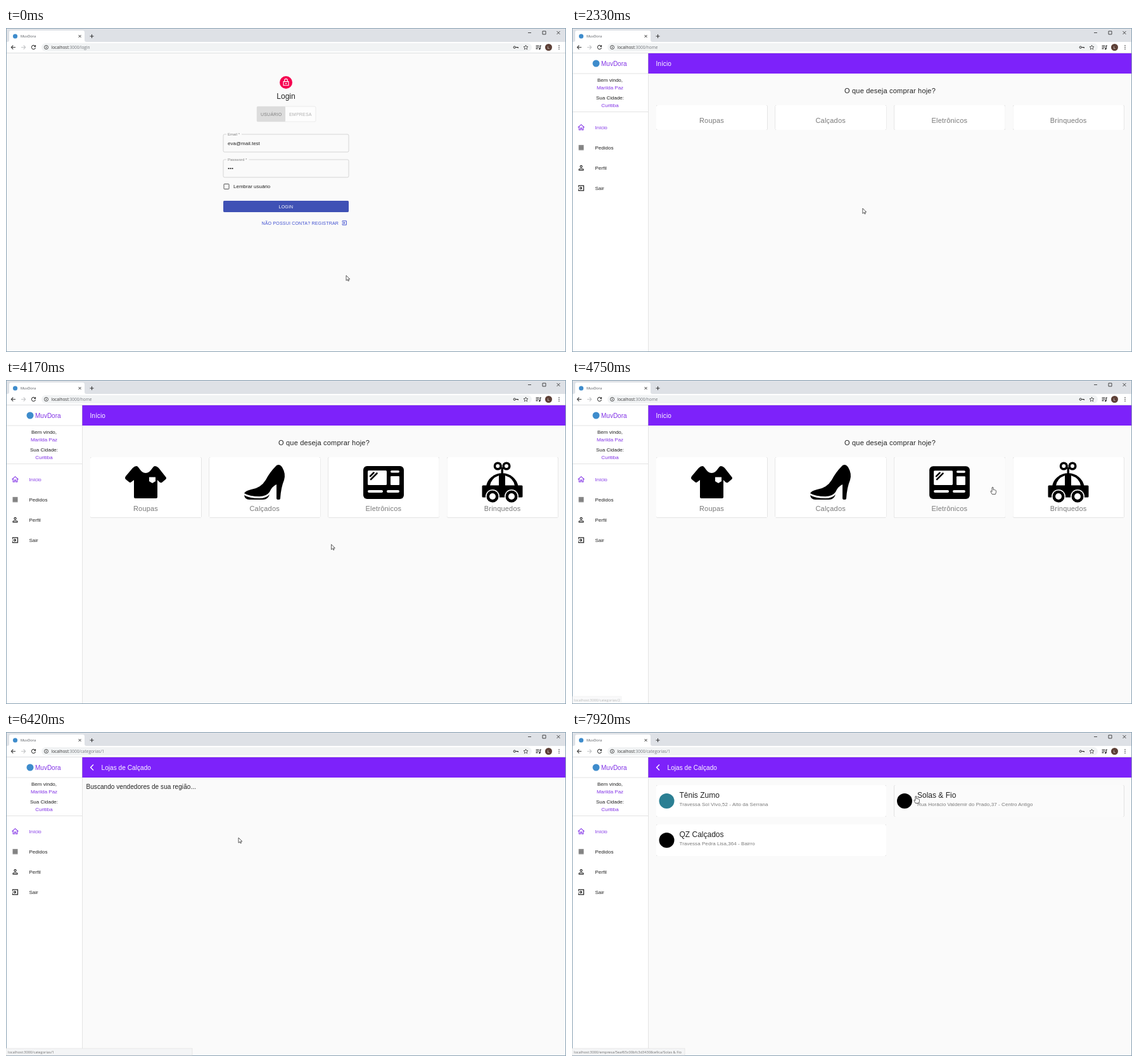
Write an HTML page that moves like this. It is 884x512 px and loops after 8000 ms.

```html
<!DOCTYPE html>
<html lang="pt-BR">
<head>
<meta charset="utf-8">
<title>MuvDora</title>
<style>
html, body { margin: 0; width: 100%; height: 100%; overflow: hidden; background: #fafafa; }
svg { display: block; width: 884px; height: 512px; }
text { font-family: "Liberation Sans", Arial, sans-serif; white-space: pre; }
.ui { font-family: "Open Sans", "Noto Sans", sans-serif; }
.mid { text-anchor: middle; }
.line { fill: none; stroke-width: 1.1; }
.lift { filter: drop-shadow(0 .9px .7px rgba(0, 0, 0, .4)); }
</style>
</head>
<body>
<svg id="stage" viewBox="0 0 884 512"></svg>
<script>
const LOOP = 8000, STEP = 1000 / 12;
const INK = '#222', DIM = '#7a7a7a', EDGE = '#e4e4e4', PURPLE = '#8233e6', BAR = '#7d22fa', CARD = '#fff';
const BRAND = 'MuvDora';

// Markup helpers
const text = (x, y, size, str, fill = INK, more = '') =>
  `<text x="${x}" y="${y}" font-size="${size}" fill="${fill}" ${more}>${str}</text>`;
const mid = (x, y, size, str, fill, more = '') => text(x, y, size, str, fill, `class="mid" ${more}`);
const ui = (x, y, size, str, fill, more = '') => text(x, y, size, str, fill, `class="ui" ${more}`);
const rect = (x, y, w, h, fill, more = '') =>
  `<rect x="${x}" y="${y}" width="${w}" height="${h}" fill="${fill}" ${more}/>`;
const dot = (x, y, r, fill, more = '') => `<circle cx="${x}" cy="${y}" r="${r}" fill="${fill}" ${more}/>`;
const path = (d, fill, more = '') => `<path d="${d}" fill="${fill}" ${more}/>`;
const line = (d, color, more = '') => `<path class="line" d="${d}" stroke="${color}" ${more}/>`;
const group = (id, body, more = '') => `<g id="${id}" ${more}>${body}</g>`;
const spaced = n => `letter-spacing="${n}"`;

const exitIcon = (x, y, size, color) =>
  line('M-4 -2v-2.2h8.4v8.4h-8.4V2M-4.4 0h5.4m-2 -2.2l2.2 2.2l-2.2 2.2', color,
    `transform="translate(${x} ${y}) scale(${size})" style="stroke-width:1.3"`);

function browser() {
  return rect(0, 0, 884, 22, '#dee1e6') +
    path('M2 22Q5 22 5 19V7Q5 4 8 4H121Q124 4 124 7V19Q124 22 127 22Z', '#fff') +
    rect(0, 22, 884, 17, '#fff') + rect(56, 24, 774, 13, '#f1f3f4', 'rx="6.5"') +
    rect(0, 39, 884, 1, '#dcdee0') +
    dot(14.5, 13, 3.6, '#3e8ccc') + ui(23, 15.2, 5.6, BRAND, '#50545a') +
    line('M114.5 11l4 4m0 -4l-4 4M132.5 13h6m-3 -3v6', INK, 'style="stroke-width:.9"') +
    line('M824 7.5h5M847 5h5v5h-5zM869.5 5l5 5m0 -5l-5 5', INK, 'style="stroke-width:.8"') +
    line('M15 30.5H8.3m3 -3l-3 3l3 3', '#444') +
    line('M24 30.5h6.7m-3 -3l3 3l-3 3', '#c4c6c8') +
    line('M46 28.6a3.1 3.1 0 1 0 .5 2.6M46.6 27v2.4h-2.4', '#444') +
    dot(63.5, 30.5, 3, 'none', `stroke="${INK}" stroke-width=".8"`) +
    line('M63.5 30v2M63.5 28.6v.8', INK, 'style="stroke-width:.8"') +
    dot(802.7, 30.5, 1.6, 'none', `stroke="${INK}"`) + line('M804.4 30.5h3.8v1.6', INK) +
    path('M820.5 27l1 2.4l2.5 .2l-1.9 1.7l.6 2.5l-2.2 -1.3l-2.2 1.3l.6 -2.5l-1.9 -1.7l2.5 -.2z', 'none',
      `stroke="${INK}" stroke-width=".7"`) +
    line('M836.5 28h5M836.5 30.3h5M836.5 32.6h3M843.2 33v-5h1.8', INK) + dot(842.3, 33, 1.2, INK) +
    dot(856.5, 30.5, 5.5, '#5d4037') + mid(856.5, 32.5, 5.5, 'L', '#fff') +
    [27.8, 30.5, 33.2].map(y => dot(873, y, .75, INK)).join('') +
    `<text class="ui" x="71.5" y="33" font-size="6.5" fill="#75797e"><tspan fill="#333">localhost</tspan>:3000/<tspan id="route"></tspan></text>`;
}

function field(y, label, gap, value) {
  return line(`M348 ${y}H345Q343 ${y} 343 ${y + 2}V${y + 26}Q343 ${y + 28} 345 ${y + 28}H539Q541 ${y + 28} 541 ${y + 26}V${y + 2}Q541 ${y} 539 ${y}H${gap}`,
    '#c4c4c4', 'style="stroke-width:.7"') +
    text(350, y + 2, 6, label, '#808080') + value;
}

function login() {
  return dot(442, 86, 10, '#f50050') +
    line('M438 84.6h8v6.2h-8zM439.6 84.4v-1.6a2.4 2.4 0 0 1 4.8 0v1.6', '#fff') + dot(442, 87.7, 1, '#fff') +
    mid(442, 112, 12, 'Login') +
    rect(396, 124, 93, 24, '#fdfdfd', `rx="2" stroke="${EDGE}" stroke-width=".7"`) +
    rect(396, 124, 45, 24, '#dcdcdc', 'rx="1"') +
    text(402, 138.5, 7, 'USUÁRIO', '#808080', spaced(.2)) +
    text(447, 138.5, 7, 'EMPRESA', '#b0b0b0', spaced(.2)) +
    field(168, 'Email *', 372, text(350, 184.6, 8, 'eva@mail.test')) +
    field(208, 'Password *', 383.5, [351.5, 354.5, 357.5].map(x => dot(x, 222, 1.1, INK)).join('')) +
    rect(344, 246.5, 8, 8, 'none', 'rx=".6" stroke="#555"') + text(359, 253.2, 8, 'Lembrar usuário') +
    rect(343, 273, 198, 18, '#3f51b5', 'id="enter" class="lift" rx="2"') +
    mid(442, 284.6, 7, 'LOGIN', '#fff', spaced(.2)) +
    text(403.5, 310.5, 7, 'NÃO POSSUI CONTA? REGISTRAR', '#3f4fd0', spaced(.2)) +
    exitIcon(534, 308, .75, '#3f4fd0');
}

function sidebar() {
  const items = [['Início', 157, PURPLE], ['Pedidos', 189, INK], ['Perfil', 221, INK], ['Sair', 253, INK]];
  return rect(0, 40, 120, 472, '#fff') + rect(120, 40, 1, 472, EDGE) +
    rect(1, 71.5, 119, 1, EDGE) + rect(1, 132, 119, 1, EDGE) +
    dot(38, 56, 5.5, '#3e8ccc') + text(46, 59.6, 10, BRAND, PURPLE) +
    mid(60, 85, 8, 'Bem vindo,') + mid(60, 97, 8, 'Marilda Paz', PURPLE) +
    mid(60, 113, 8, 'Sua Cidade:') + mid(60, 125, 8, 'Curitiba', PURPLE) +
    items.map(([name, y, color]) => text(36.5, y + 2.7, 8, name, color)).join('') +
    line('M9.5 157.2l5 -4.5l5 4.5M11.2 156v5h2.3v-3h2v3h2.3v-5', PURPLE) +
    line('M10.5 185.7h8M10.5 187.9h8M10.5 190.1h8M10.5 192.3h8', INK) +
    dot(14.5, 219, 1.6, 'none', `stroke="${INK}" stroke-width="1.1"`) +
    line('M11 224.6v-1.2Q11 222.3 14.5 222.3T18 223.4v1.2z', INK) +
    exitIcon(14.3, 253, .95, INK);
}

const ICONS = [
  path('M206 136C210 136 212 147 220.5 147S231 136 235 136Q238 136 241 139L252 153Q254 155 252 157L246 162Q244 163 242 161L239 158V185Q239 187 237 187H204Q202 187 202 185V158L198 161Q196 163 194 161L189 157Q187 155 189 152L200 139Q203 136 206 136Z', '#000') +
    path('M226 153.5H236V160L231 163L226 160Z', CARD),
  path('M427 135Q432 132 436 138Q442 148 439 158Q434 170 433 187Q433 189 430 189Q427 189 427 187V165Q420 168 416 177Q411 184 400 184Q384 184 376 179Q378 175 387 173Q402 171 410 158Q416 146 427 135Z', '#000') +
    path('M376 182Q384 187 400 187Q410 187 416 181Q413 189 406 189H384Q377 189 376 182Z', '#000'),
  rect(564, 136, 64, 52, '#000', 'rx="6"') + rect(571, 143, 30, 23, CARD, 'rx="1.5"') +
    rect(607, 143, 14, 3.5, CARD, 'rx="1.7"') + rect(607, 152, 14, 14, CARD, 'rx="1"') +
    rect(571, 174, 24, 4, CARD, 'rx="2"') + rect(601, 174, 20, 4, CARD, 'rx="2"') +
    line('M575 152l5.5 -5.5M576 157l9.5 -9.5', '#000', 'style="stroke-width:2.6" stroke-linecap="round"'),
  path('M758 168A25.5 24 0 0 1 808.5 168Z', '#000') +
    path('M764 167Q766 155 778 151V167ZM788 151Q801 155 803 167H788Z', CARD) +
    rect(751.5, 166.5, 64, 19, '#000', 'rx="1.5"') +
    [768, 798].map(x => dot(x, 184, 11, CARD) + dot(x, 184, 9.5, '#000') + dot(x, 184, 5, CARD)).join('') +
    rect(781.5, 138, 3.5, 12, '#000') + dot(783.2, 152, 4, '#000') +
    [776.3, 790].map(x => dot(x, 136, 4.8, 'none', 'stroke="#000" stroke-width="3.6"')).join('')
];
const NAMES = ['Roupas', 'Calçados', 'Eletrônicos', 'Brinquedos'];
const cardX = i => 133 + i * 187.7;

function home() {
  return text(132.5, 59.6, 10, 'Início', '#fff', spaced(.07)) +
    mid(502, 102.6, 11, 'O que deseja comprar hoje?', INK, spaced(.2)) +
    NAMES.map((name, i) =>
      rect(cardX(i), 122, 175.5, 39, CARD, `id="card${i}" class="lift" rx="2"`) +
      group('icon' + i, ICONS[i]) +
      mid(cardX(i) + 87.5, 0, 11, name, DIM, `id="name${i}" ${spaced(.2)}`)).join('');
}

const STORES = [
  { x: 133, y: 84, name: 'Tênis Zumo', street: 'Travessa Sol Vivo,52 - Alto da Serrana', color: '#2b7f93', id: '5eaf61b20bfc3d34308ce9c4' },
  { x: 508.5, y: 84, name: 'Solas &amp; Fio', street: 'Rua Horácio Valdemir do Prado,37 - Centro Antigo', color: '#000', id: '5eaf65c00bfc3d34308ce9ca' },
  { x: 133, y: 146, name: 'QZ Calçados', street: 'Travessa Pedra Lisa,364 - Bairro', color: '#000', id: '5eaf67d40bfc3d34308ce9d1' }
];
const storeUrl = i => `empresa/${STORES[i].id}/${STORES[i].name}`;

function shops() {
  return line('M138 51.6L133.6 56L138 60.4', '#fff', 'style="stroke-width:1.4"') +
    text(150.5, 59.6, 10, 'Lojas de Calçado', '#fff', spaced(.07)) +
    group('wait', text(126.5, 89.6, 10, 'Buscando vendedores de sua região...', INK, spaced(.06))) +
    group('list', STORES.map((s, i) =>
      rect(s.x, s.y, 363, 50, CARD, `id="store${i}" class="lift" rx="2"`) + dot(s.x + 16.5, s.y + 25, 12, s.color) +
      text(s.x + 36.5, s.y + 20.2, 12, s.name) + text(s.x + 36.5, s.y + 33.4, 8, s.street, DIM, spaced(.07))).join(''));
}

const stage = document.getElementById('stage');
stage.innerHTML = rect(0, 0, 884, 512, '#fafafa') +
  group('login', login()) +
  group('app', sidebar() + rect(120.5, 40, 764, 32, BAR, 'class="lift"') +
    group('home', home()) + group('shops', shops())) +
  browser() +
  rect(.5, .5, 883, 511, 'none', 'stroke="#8aa2b4" stroke-width="1"') +
  group('status', rect(0, 500, 78, 11, '#f4f5f6', 'id="bubble" stroke="#dcdcdc" stroke-width=".6"') +
    ui(3, 508, 5.7, '', '#707070', 'id="link"')) +
  group('cursor',
    path('M0 0V8.2L2 6.4L3.2 9L4.5 8.4L3.3 5.9H5.8Z', '#fff', 'id="arrow"') +
    path('M-1 1Q0 -.6 1 1V4.5Q2 3.7 2.8 4.8Q3.8 4.2 4.3 5.2Q5.4 5 5.4 6.4V8.6L4.4 11.5H-.8L-3 7.6Q-3.4 6.2 -2 6.4L-1 7.4Z', '#fff', 'id="hand"'),
    'stroke="#333" stroke-width=".8" stroke-linejoin="round"');

const el = {};
stage.querySelectorAll('[id]').forEach(n => el[n.id] = n);
const show = (node, on) => node.setAttribute('display', on ? 'inline' : 'none');
const set = (node, attrs) => { for (const k in attrs) node.setAttribute(k, attrs[k]); };
const clamp = v => Math.max(0, Math.min(1, v));

// Page changes in ms
const HOME = 2080, ICONS_IN = 2490, SHOPS = 6410, LIST_IN = 6660;

// Pointer stops: time, x, y
const WAY = [
  [0, 537, 391], [250, 537, 391], [1080, 537, 306], [1500, 537, 290], [1600, 537, 290],
  [1920, 459, 285], [2330, 459, 285], [2920, 435, 283], [3200, 292, 219], [3400, 268, 160],
  [3480, 270, 168], [3670, 300, 250], [3900, 390, 266], [4500, 668, 252], [4690, 668, 219],
  [4750, 664, 169], [5330, 146, 138], [5500, 137, 131], [6170, 367, 167], [6850, 367, 167],
  [7750, 480, 114], [7900, 543, 101], [8000, 543, 101]
];
function pointer(t) {
  const i = Math.max(1, WAY.findIndex(w => w[0] >= t));
  const [t0, x0, y0] = WAY[i - 1], [t1, x1, y1] = WAY[i];
  const k = clamp((t - t0) / (t1 - t0));
  return [x0 + (x1 - x0) * k, y0 + (y1 - y0) * k];
}

const inside = ([x, y], l, t, w, h) => x >= l && x <= l + w && y >= t && y <= t + h;
const onEnter = p => inside(p, 343, 273, 198, 18);
const onCard = (p, i) => inside(p, cardX(i), 122, 175.5, 95);
const onStore = (p, i) => inside(p, STORES[i].x, STORES[i].y, 363, 50);

// Share of the last moments spent over a target eases hover in and out
function hover(t, hit) {
  let n = 0;
  for (let k = 0; k < 8; k++) n += hit(pointer(Math.max(0, t - k * 20))) ? 1 : 0;
  return (n / 8) ** 2;
}
const grey = v => `rgb(${v},${v},${v})`;

const LINKS = [
  [0, ''], [4660, 'categorias/2'], [5000, 'categorias/1'], [5240, 'categorias/0'],
  [5740, 'categorias/1'], [6580, ''], [6910, storeUrl(2)], [7410, storeUrl(0)], [7830, storeUrl(1)]
];

function drawCard(i, t) {
  const full = t >= ICONS_IN, h = full ? hover(t, p => onCard(p, i)) : 0;
  set(el['card' + i], {
    x: cardX(i) - h, y: 122 - h * .6, width: 175.5 + 2 * h, height: (full ? 95.5 : 39) + 3 * h,
    fill: grey(255 - 18 * h)
  });
  const cx = cardX(i) + 87.5, s = 1 - .03 * h;
  set(el['icon' + i], { transform: `translate(${cx} ${162 + h * .7}) scale(${s}) translate(${-cx} -162)` });
  show(el['icon' + i], full);
  set(el['name' + i], { y: (full ? 206.6 : 150) + h * .5 });
}

function draw(time) {
  const t = Math.floor((time + 5) / STEP) * STEP;
  const isHome = t >= HOME && t < SHOPS, isShops = t >= SHOPS;
  const p = pointer(t);

  show(el.login, t < HOME);
  show(el.app, t >= HOME);
  show(el.home, isHome);
  show(el.shops, isShops);
  show(el.wait, t < LIST_IN);
  show(el.list, t >= LIST_IN);
  el.route.textContent = isShops ? 'categorias/1' : isHome ? 'home' : 'login';

  const e = hover(t, onEnter);
  set(el.enter, { fill: `rgb(${63 - 15 * e},${81 - 18 * e},${181 - 22 * e})` });
  NAMES.forEach((_, i) => drawCard(i, t));
  STORES.forEach((_, i) => set(el['store' + i], { fill: grey(255 - 10 * hover(t, p => onStore(p, i))) }));

  const [from, url] = LINKS.filter(l => l[0] <= t).pop();
  show(el.status, url);
  if (url) {
    const fresh = url === 'categorias/2' || url === storeUrl(2);
    el.link.innerHTML = 'localhost:3000/' + url;
    set(el.status, { opacity: fresh ? clamp((t - from + 40) / 260) : 1 });
    set(el.bubble, { width: url.startsWith('emp') ? 178 : isShops ? 294 : 78 });
  }

  const hand = t < HOME ? onEnter(p)
    : isHome ? t >= ICONS_IN && NAMES.some((_, i) => onCard(p, i))
    : t >= LIST_IN && STORES.some((_, i) => onStore(p, i));
  show(el.hand, hand);
  show(el.arrow, !hand);
  set(el.cursor, { transform: `translate(${p[0]} ${p[1]})` });
}

const start = performance.now();
function tick() {
  draw((performance.now() - start) % LOOP);
  requestAnimationFrame(tick);
}
tick();
</script>
</body>
</html>
```
